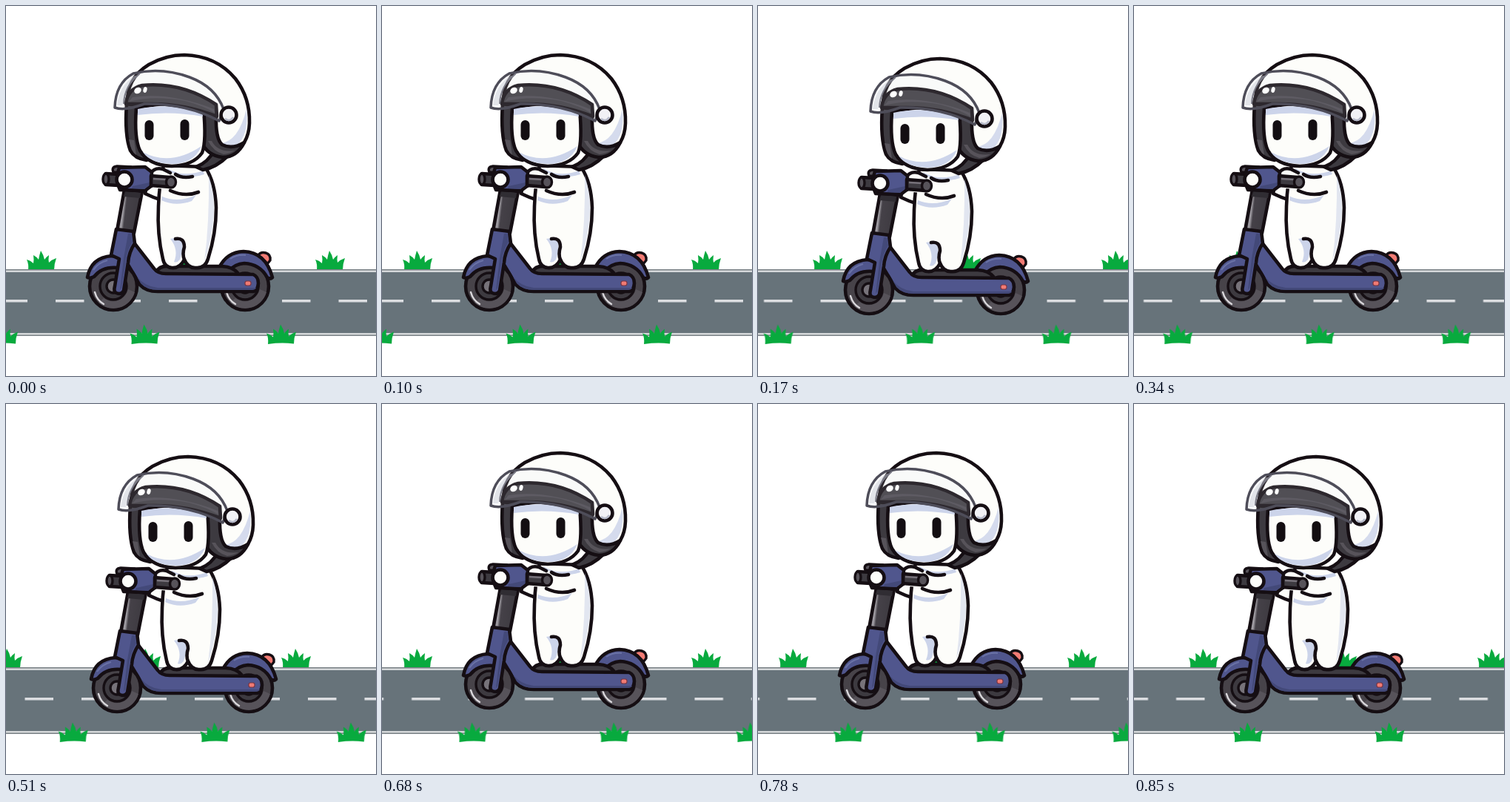
Write an HTML page that moves like this. It is 500x499 px and loops after 1.02 s.

```html
<!DOCTYPE html>
<html lang="en">
<head>
<meta charset="utf-8">
<title>Scooter ride</title>
<style>
  html, body { margin: 0; width: 100%; height: 100%; overflow: hidden; background: #fff; }
  svg { display: block; width: 100vw; height: 100vh; }
  .move { animation: 1.02s step-end infinite; }
  #rider { animation-name: bob; animation-duration: .34s; }
  #back { animation-name: back; }
  #front { animation-name: front; animation-timing-function: steps(6); }
  #dashes { animation-name: dashes; }
  @keyframes bob { 50% { transform: translate(5px, 5px); } }
  @keyframes back {
    0%, 66.667% { transform: translateX(0); }
    16.667%, 83.333% { transform: translateX(46px); }
    33.333% { transform: translateX(92px); }
    50% { transform: translateX(-46px); }
  }
  @keyframes front { to { transform: translateX(189.6px); } }
  @keyframes dashes {
    0% { transform: translateX(0); }
    16.667% { transform: translateX(17.5px); }
    33.333% { transform: translateX(22.5px); }
    50% { transform: translateX(35px); }
    66.667% { transform: translateX(49.5px); }
    83.333% { transform: translateX(66.5px); }
  }
  .ink { stroke: #150e13; stroke-width: 4.6; stroke-linejoin: round; stroke-linecap: round; }
  .thin { stroke-width: 3.4; }
  .line { fill: none; }
  .white { fill: #fdfdfa; }
  .shade { fill: #ccd4ea; }
  .blue { fill: #50568d; }
  .deep { fill: #434979; }
  .dark { fill: #3d3a40; }
  .grey { fill: #57535a; }
  .red { fill: #f17b74; }
</style>
</head>
<body>
<svg viewBox="0 0 500 499" preserveAspectRatio="none">
  <defs>
    <path id="grass" fill="#08aa3e" d="M-18 26.500 Q-17 18 -20 12 Q-15 13 -11 17 Q-10 12 -11 6 Q-7 8 -4 12 Q-3 6 -1 0 Q3 6 4 12 Q7 8 10 6 Q9 12 10 16 Q14 12 20 10 Q17 18 17 26 Q0 24 -18 26.500Z"/>
    <g id="wheel">
      <circle class="ink" r="32" fill="#474349"/>
      <path d="M-20 22 A30 30 0 0 0 29 8 L20 4 A21 21 0 0 1 -13 16Z" class="grey"/>
      <circle class="ink thin dark" r="18"/>
      <circle class="ink thin" r="9" fill="#77737a"/>
      <path d="M-25 8 Q-22 19 -13 24" fill="none" stroke="#d9d7db" stroke-width="2.5" stroke-linecap="round"/>
    </g>
    <linearGradient id="steel" x2="1" y2=".2">
      <stop offset=".15" stop-color="#59555c"/>
      <stop offset=".32" stop-color="#a5a2a8"/>
      <stop offset=".42" stop-color="#454148"/>
      <stop offset="1" stop-color="#3d3a40"/>
    </linearGradient>
  </defs>

  <g id="back" class="move">
    <use href="#grass" x="48" y="330"/>
    <use href="#grass" x="235" y="330"/>
    <use href="#grass" x="438" y="330"/>
  </g>

  <rect y="355" width="500" height="90" fill="#777f84"/>
  <rect y="356.500" width="500" height="87" fill="#d5d8da"/>
  <rect y="359" width="500" height="82" fill="#67737a"/>
  <path id="dashes" class="move" d="M-86 397.700H580" stroke="#dcdee1" stroke-width="3.500" stroke-dasharray="38.5 38" fill="none"/>

  <g id="front" class="move">
    <use href="#grass" x="-4" y="429.500"/>
    <use href="#grass" x="187.500" y="429.500"/>
    <use href="#grass" x="372" y="429.500"/>
  </g>

  <g id="rider" class="move">
    <!-- rear wheel and fender -->
    <use href="#wheel" x="323" y="378"/>
    <path class="ink thin red" d="M340 337 Q344 331 351 333 Q358 335 357 343 L353 348Z"/>
    <path class="ink blue" d="M288 353 Q298 332 321 331 Q351 332 360 366 Q357 369 353 366 Q343 348 322 347 Q309 348 302 357Z"/>
    <path class="line" d="M303 341 Q312 335 324 336" stroke="#6a72a6" stroke-width="2"/>

    <!-- deck -->
    <path class="ink dark" d="M203 359 Q207 350 220 351 L292 351 Q307 352 313 360 L310 364 H205Z"/>
    <path class="ink blue" d="M172 318 L200 354 Q205 361 216 361 L334 362 Q341 365 341 374 Q340 385 333 385 L205 385 Q189 385 181 376 L156 334Z"/>
    <path class="deep" d="M177 365 Q187 378 205 380 L338 380 Q337 383 332 383 L206 383 Q190 383 182 374Z"/>
    <rect class="red" x="323" y="371" width="8" height="6" rx="2.500" stroke="#7d3540" stroke-width="1.200"/>

    <!-- far arm -->
    <path class="ink white" d="M188 253 Q198 258 211 262 L216 242 L190 243Z"/>

    <!-- body -->
    <path class="ink white" d="M213 215 Q207 240 206 270 Q204 308 212 341 Q214 352 224 353 Q235 354 241 342 Q246 354 257 353 Q269 354 273 341 Q284 307 284 272 Q283 238 269 217Z"/>
    <path class="shade" d="M274 228 Q281 250 281 275 Q280 310 268 345 Q275 292 274 228Z" opacity=".55"/>
    <path class="shade" d="M222 314 Q234 311 238 319 Q240 327 235 342 Q231 347 227 345 Q234 329 222 314Z"/>
    <path class="shade" d="M211 257 Q232 266 257 255 L251 263 Q229 271 210 262Z"/>
    <path class="ink line" d="M229 314 Q241 312 241 325 Q238 335 241 342"/>
    <path class="shade" d="M218 219 Q240 232 266 222 L268 227 Q241 235 218 226Z"/>

    <!-- stem and front wheel -->
    <path class="ink" fill="url(#steel)" d="M160 248 L184 250 L173 306 L150 303Z"/>
    <path d="M161 250 L182 252 L181 259 L159 257Z" fill="#302d33"/>
    <use href="#wheel" x="145" y="378"/>
    <path class="ink blue" d="M110 366 Q115 339 143 337 L161 340 L157 354 Q132 349 119 365 Q114 368 110 366Z"/>
    <path class="line" d="M118 356 Q125 346 137 343" stroke="#6a72a6" stroke-width="2"/>
    <path class="ink blue" d="M149 301 L172 304 L174 320 Q166 332 165 346 L159 384 Q156 390 149 387 Q145 385 147 378 L153 341 L142 336Z"/>
    <path class="deep" d="M165 307 L169 307 L171 318 Q162 332 161 350 L156 380 L154 383 L159 340Z"/>

    <!-- handlebar -->
    <path class="ink thin grey" d="M145 224 Q142 217 150 216 L169 217 L163 225Z"/>
    <path class="ink dark" d="M135 226 L152 227 V242 L135 241Z"/>
    <ellipse class="ink thin grey" cx="135" cy="233.500" rx="4" ry="7.500"/>
    <path class="white" d="M194 231 Q196 220 208 219 Q218 218 224 225 L249 231 Q268 239 261 251 Q240 257 221 248 L198 245Z"/>
    <path class="ink line" d="M195 226 Q201 217 212 220 L222 225 M229 227 Q238 233 252 230 M222 249 Q242 258 260 251"/>
    <path class="ink blue" d="M153 218 L188 217 L197 224 L196 243 L188 249 L154 248 Q147 234 153 218Z"/>
    <path class="deep" d="M171 243 L194 238 L193 242 L187 247 L170 246Z"/>
    <circle class="ink white" cx="160" cy="234" r="10.500"/>
    <path class="ink dark" d="M196 229 L221 231 V244 L196 242Z"/>
    <path d="M199 233 L216 234" stroke="#77727a" stroke-width="2.500"/>
    <ellipse class="ink thin grey" cx="223" cy="237.500" rx="6.500" ry="7.500"/>

    <!-- helmet -->
    <path class="ink dark" d="M282 194 Q273 211 257 217 L266 221 Q284 218 300 202Z"/>
    <path class="ink white" d="M164 133 Q162 98 193 79 Q216 66 241 66 Q284 67 310 98 Q330 124 329 158 Q328 188 303 202 L270 190 L255 130Z"/>
    <path class="shade" d="M325 139 Q329 184 302 193 L290 185 Q314 183 325 139Z" opacity=".8"/>
    <path class="ink dark" d="M163 132 Q160 174 168 195 Q174 206 190 208 L187 136Z"/>
    <path class="ink dark" d="M262 136 L284 148 Q283 179 292 187 Q306 194 322 184 Q312 204 293 204 Q272 202 263 182Z"/>
    <path class="grey" d="M166 180 Q169 197 176 201 L173 181Z"/>
    <path class="grey" d="M273 182 Q280 196 294 200 Q303 199 309 195 Q286 198 278 182Z"/>

    <!-- face -->
    <path class="ink white" d="M176 138 Q173 178 181 195 Q193 215 224 216 Q253 215 265 198 Q271 183 267 139 Q222 126 176 138Z"/>
    <path class="shade" d="M178 139 Q222 130 265 143 L266 149 Q222 141 178 147Z"/>
    <path class="shade" d="M185 197 Q222 217 264 189 Q254 213 224 213 Q195 212 185 197Z"/>
    <rect x="187.500" y="154" width="12" height="27" rx="6" fill="#130e12"/>
    <rect x="235.500" y="153" width="12" height="28" rx="6" fill="#130e12"/>

    <!-- visor -->
    <path class="ink dark" d="M162 132 Q164 112 184 107 Q238 102 284 133 L285 149 Q240 131 190 132Z"/>
    <path class="grey" d="M166 129 Q199 120 242 128 Q268 135 282 144 L281 139 Q222 116 171 123Z" opacity=".6"/>
    <path d="M147 137 Q148 104 172 91 Q210 82 248 96 Q283 109 294 139 L288 155 Q244 131 187 132 Q160 142 147 137Z" fill="#dfe2e8" fill-opacity=".12" stroke="#4e4d59" stroke-width="3.500" stroke-linejoin="round"/>
    <path d="M150 134 Q153 107 174 94 L180 94 Q160 108 157 134Z" fill="#c9ccd5" opacity=".5"/>
    <path class="line" d="M159 132 Q160 107 181 91" stroke="#777783" stroke-width="2"/>
    <ellipse cx="178" cy="114" rx="5" ry="4" fill="#fff" transform="rotate(-30 178 114)"/>
    <ellipse cx="188" cy="113" rx="2.500" ry="4" fill="#fff" transform="rotate(15 188 113)"/>
    <circle class="ink" cx="301" cy="147" r="10.500" fill="#f1f1f5"/>
    <path class="line" d="M296 152 Q302 157 307 150" stroke="#b5b9c9" stroke-width="2.500"/>
  </g>
</svg>
</body>
</html>
```
